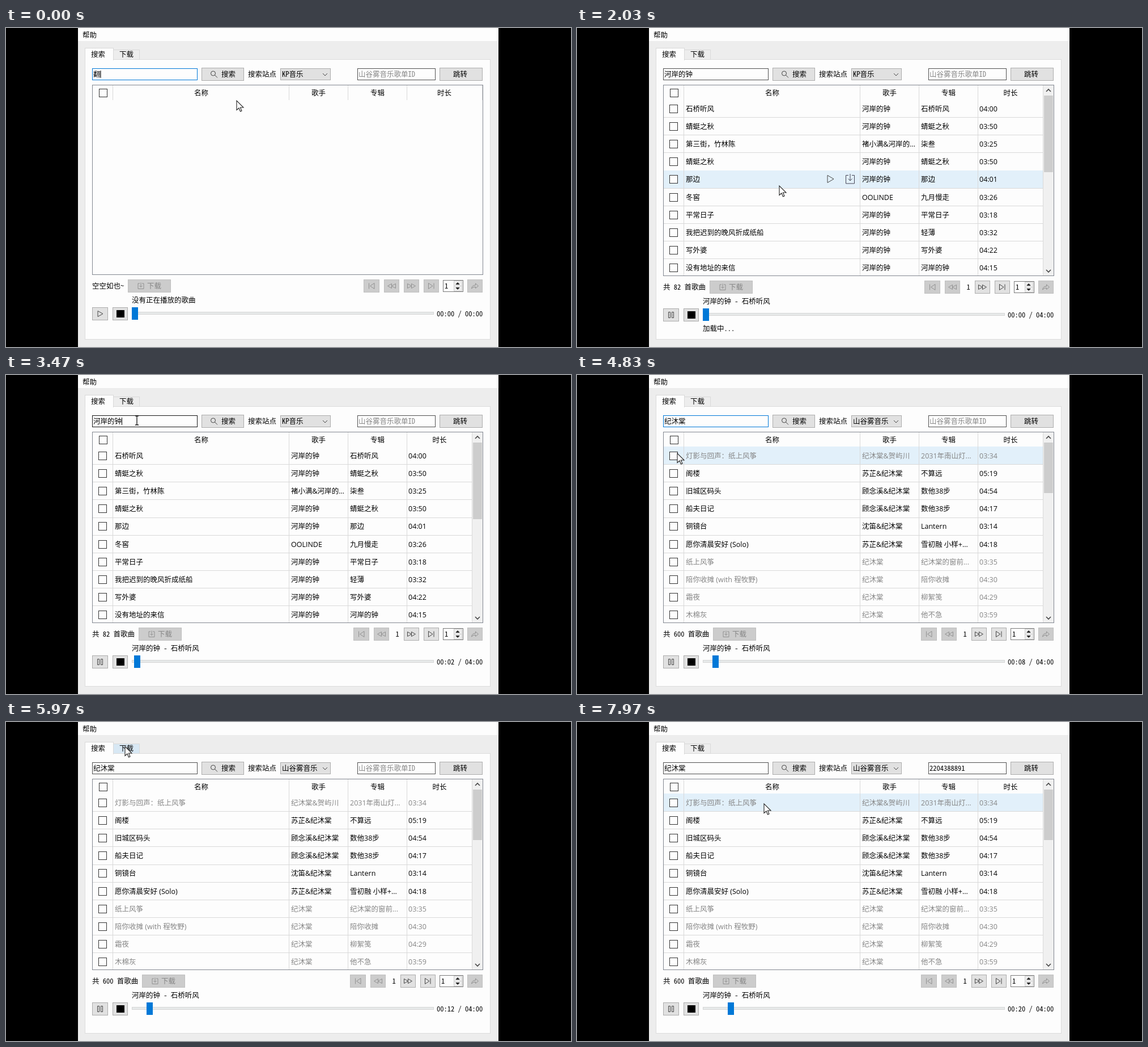
Animation, 997 px wide and 562 px high, one loop 8 s. Source, as an HTML page with a canvas:

```html
<!DOCTYPE html>
<html lang="zh-CN">
<head>
<meta charset="utf-8">
<style>
html, body { margin: 0; width: 100%; height: 100%; overflow: hidden; background: #000; }
canvas { display: block; }
</style>
</head>
<body>
<canvas id="stage" width="997" height="562"></canvas>
<script>
const c = document.getElementById('stage').getContext('2d');
const LOOP = 8000;
const UI = '12.5px "Noto Sans Mono CJK SC", "Noto Sans CJK SC", "Noto Sans CJK", monospace';
const CELL = '12.5px "Open Sans", "Noto Sans CJK SC", "Noto Sans CJK", sans-serif';
const PAPER = '#fdfdfd', INK = '#000', GREY = '#858585', BLUE = '#0078d7', RULE = '#d9d9d9';
const ROW_TOP = 126, ROW_HEIGHT = 31.15;

const BAND = '河岸的钟', SINGER = '纪沐棠', SITES = ['KP音乐', '山谷雾音乐'];

// title | artist | album | length; a leading "-" marks an unavailable song
const parse = list => list.trim().split('\n').map(line => ({
  off: line[0] === '-',
  cells: line.replace(/^-/, '').replaceAll('@', BAND).replaceAll('#', SINGER).split('|')
}));
const bandSongs = parse(`
石桥听风|@|石桥听风|04:00
蜻蜓之秋|@|蜻蜓之秋|03:50
第三街，竹林陈|褚小满&河岸的...|柒叁|03:25
蜻蜓之秋|@|蜻蜓之秋|03:50
那边|@|那边|04:01
冬窖|OOLINDE|九月慢走|03:26
平常日子|@|平常日子|03:18
我把迟到的晚风折成纸船|@|轻薄|03:32
写外婆|@|写外婆|04:22
没有地址的来信|@|@|04:15`);
const singerSongs = parse(`
-灯影与回声：纸上风筝|#&贺屿川|2031年南山灯...|03:34
阁楼|苏芷&#|不算远|05:19
旧城区码头|顾念溪&#|数他38步|04:54
船夫日记|顾念溪&#|数他38步|04:17
铜镜台|沈笛&#|Lantern|03:14
愿你清晨安好 (Solo)|苏芷&#|雪初融 小样+...|04:18
-纸上风筝|#|#的窗前...|03:35
-陪你收摊 (with 程牧野)|#|陪你收摊|04:30
-霜夜|#|柳絮笺|04:29
-木棉灰|#|他不急|03:59`);

// [time, value] steps: the last one reached applies
const step = (t, list) => list.filter(([at]) => t >= at).pop()[1];
const queries = [[0, '翻'], [260, ''], [420, BAND], [3620, ''], [3800, SINGER]];
const pages = [[0, null],
  [1000, { songs: bandSongs, count: 82, thumb: 135, shift: 0 }],
  [4650, { songs: singerSongs, count: 600, thumb: 89, shift: 6 }]];
const pointerPath = [[0, 407, 128], [420, 407, 128], [750, 385, 81], [900, 385, 81], [1450, 447, 141],
  [1600, 447, 141], [2030, 357, 278], [2700, 320, 240], [3300, 231, 80], [3850, 231, 80], [4150, 530, 81],
  [4300, 530, 81], [4500, 385, 81], [4600, 385, 81], [4830, 177, 138], [5400, 190, 190], [5970, 210, 43],
  [6120, 210, 43], [6500, 680, 80], [6750, 680, 80], [6930, 628, 139], [7970, 330, 144], [LOOP, 330, 144]];

function pointerAt(t) {
  const i = pointerPath.findIndex(p => p[0] > t);
  const [t0, x0, y0] = pointerPath[i - 1], [t1, x1, y1] = pointerPath[i];
  const k = (t - t0) / (t1 - t0), e = k * k * (3 - 2 * k);
  return { x: x0 + (x1 - x0) * e, y: y0 + (y1 - y0) * e };
}

function rect(x, y, w, h, fill) { c.fillStyle = fill; c.fillRect(x, y, w, h); }
function box(x, y, w, h, fill, border) {
  rect(x, y, w, h, border);
  rect(x + 1, y + 1, w - 2, h - 2, fill);
}
function text(s, x, y, color = INK, font = UI, align = 'left') {
  c.font = font; c.fillStyle = color; c.textAlign = align;
  c.fillText(s, x, y + 4.6);
}
function path(x, y, d, color, width = 1, fill) {
  c.save();
  c.translate(x, y);
  const p = new Path2D(d);
  if (fill) { c.fillStyle = fill; c.fill(p); }
  c.strokeStyle = color; c.lineWidth = width; c.stroke(p);
  c.restore();
}
const inside = (p, x, y, w, h) => p.x >= x && p.x < x + w && p.y >= y && p.y < y + h;

const ICON = {
  search: 'M2.5-1.5a4 4 0 1 1-8 0a4 4 0 1 1 8 0M1.5 1.5L6 6',
  save: 'M-2-4.5H-5V5H5V-4.5H2M0-6V2M-2.5-.5L0 2L2.5-.5',
  play: 'M-4-5L5 0L-4 5Z',
  pause: 'M-4.5-5h3v10h-3zM1.5-5h3v10h-3z',
  first: 'M-4.5-5V5M5-5L-2.5 0L5 5Z',
  back: 'M0-4L-7 0L0 4ZM7-4L0 0L7 4Z',
  next: 'M0-4L7 0L0 4ZM-7-4L0 0L-7 4Z',
  last: 'M4.5-5V5M-5-5L2.5 0L-5 5Z',
  go: 'M-6 4.5Q-5-1.5 1-1.5V-4.5L6 0L1 4V1.5Q-3 1-6 4.5Z',
  down: 'M-4-2L0 2L4-2',
  up: 'M-4 2L0-2L4 2'
};

function button(x, y, w, enabled = true, icon, iconX = w / 2) {
  box(x, y - 11, w, 23, enabled ? '#e1e1e1' : '#cccccc', enabled ? '#adadad' : '#bfbfbf');
  if (icon) path(x + iconX, y + .5, ICON[icon], enabled ? '#444' : '#909090');
}

function checkbox(x, y) { box(x - 7, y - 7, 15, 15, PAPER, '#333'); }

function drawFrameAndTabs(pointer) {
  rect(0, 0, 997, 562, '#000');
  rect(127, 0, 742, 562, '#ededed');
  rect(127, 0, 742, 23, PAPER);
  text('帮助', 135, 12);
  box(139, 55, 716, 494, PAPER, '#dcdcdc');
  const hover = inside(pointer, 190, 38, 46, 18);
  box(189, 38, 47, 18, hover ? '#d8e8f4' : '#ededed', '#d9d9d9');
  box(139, 35, 51, 22, PAPER, '#d9d9d9');
  rect(140, 54, 49, 3, PAPER);
  text('搜索', 150, 46);
  text('下载', 200, 46);
}

function drawToolbar(t, pointer) {
  const focused = t < 880 || (t >= 3500 && t < 5100);
  const edge = (x, w) => inside(pointer, x, 70, w, 22) ? '#171717' : '#505050';
  const query = step(t, queries);
  box(152, 71, 186, 21, PAPER, focused ? BLUE : edge(152, 186));
  text(query, 154, 81.5);
  if (t < 600 || (t >= 3430 && t < 3950)) rect(154 + query.length * 12.5, 75, 1, 13, '#000');

  button(345, 81, 75, true, 'search', 22);
  text('搜索', 380, 81.5);
  text('搜索站点', 427, 81.5);
  box(484, 71, 89, 21, '#e1e1e1', '#adadad');
  text(SITES[t < 4250 ? 0 : 1], 487, 81.5);
  path(563, 82, ICON.down, '#444');

  box(620, 71, 138, 21, PAPER, edge(620, 138));
  if (t < 6780) text(SITES[1] + '歌单ID', 622, 81.5, GREY);
  else text('2204388891', 622, 81.5);
  button(765, 81, 76);
  text('跳转', 789, 81.5);
}

function drawRow(song, i, pointer) {
  const top = ROW_TOP + i * ROW_HEIGHT, mid = Math.round(top + ROW_HEIGHT / 2 + .2);
  if (inside(pointer, 153, top, 670, ROW_HEIGHT)) {
    rect(153, Math.round(top), 670, 31, '#e2f0fa');
    if (!song.off) {
      path(447, mid, 'M-5-6.5L6 0L-5 6.5Z', '#444');
      path(482, mid, 'M-3-6.5H-7.5V8H7.5V-6.5H3M0-9V3M-3.5-.5L0 3L3.5-.5', '#445');
    }
  }
  rect(153, Math.round(top + ROW_HEIGHT), 670, 1, RULE);
  checkbox(170, mid);
  [192, 503, 607, 710].forEach((x, k) => text(song.cells[k], x, mid, song.off ? GREY : INK, CELL));
}

function drawTable(page, pointer) {
  const height = page ? 337 : 335, bottom = 100 + height;
  box(152, 100, 690, height, PAPER, '#828790');
  c.save();
  c.beginPath();
  c.rect(153, 101, 688, height - 2);
  c.clip();
  if (page) page.songs.forEach((song, i) => drawRow(song, i, pointer));
  for (const x of [188, 499, 603, 707]) rect(x, 101, 1, page ? height : 26, RULE);
  checkbox(171, 114);
  const heads = [['名称', 344.5], ['歌手', 551.5], ['专辑', 655.5], ['时长', page ? 765 : 773.5]];
  for (const [label, x] of heads) text(label, x, 114, INK, CELL, 'center');
  if (page) {
    rect(822, 101, 1, height, RULE);
    rect(823, 101, 18, height, '#f0f0f0');
    rect(824, 119, 16, page.thumb, '#cdcdcd');
    path(832, 110, ICON.up, '#444', 1.6);
    path(832, bottom - 9, ICON.down, '#444', 1.6);
  } else {
    rect(840, 101, 1, 26, RULE);
  }
  c.restore();
}

function drawPager(page, y) {
  const label = page ? `共 ${page.count} 首歌曲` : '空空如也~';
  text(label, 152, y);
  const saveX = page ? 234 + page.shift : 215;
  button(saveX, y, 76, false, 'save', 23);
  text('下载', saveX + 34, y + .5, GREY);

  const shift = page ? page.shift : 0, lead = page ? 18 : 0;
  button(631 - lead - shift, y, 28, false, 'first');
  button(667 - lead - shift, y, 27, false, 'back');
  if (page) text('1', 687.5 - shift, y);
  button(702 - shift, y, 27, !!page, 'next');
  button(737 - shift, y, 27, !!page, 'last');

  box(771 - shift, y - 10, 36 + shift, 21, PAPER, '#7a7a7a');
  text('1', 774 - shift, y);
  box(790, y - 9, 15, 10, '#eee', '#ccc');
  box(790, y, 15, 10, '#eee', '#ccc');
  path(797, y - 4, 'M-3 1.5L0-1.5L3 1.5Z', '#222', 1, '#222');
  path(797, y + 5, 'M-3-1.5L0 1.5L3-1.5Z', '#222', 1, '#222');
  button(814, y, 27, false, 'go');
}

function drawPlayer(t, y) {
  const started = t >= 1520;
  const seconds = Math.max(0, Math.floor((t - 2820) / 250));
  text(started ? `${BAND} - 石桥听风` : '没有正在播放的歌曲', 222, y - 24);
  button(152, y, 28, true, started ? 'pause' : 'play');
  button(188, y, 27);
  rect(195, y - 6, 14, 13, '#000');
  box(222, y - 3, 533, 5, '#e7eaea', '#d6d6d6');
  rect(Math.round(222 + seconds * 523 / 240), y - 11, 11, 22, BLUE);
  text(`00:${String(seconds).padStart(2, '0')} / ${started ? '04' : '00'}:00`, 760, y);
  if (started && t < 2820) text('加载中...', 222, y + 24);
}

function drawPointer(p) {
  const overField = inside(p, 152, 71, 186, 21) || inside(p, 620, 71, 138, 21);
  if (overField) path(p.x, p.y, 'M-3-8H-1L0-7L1-8H3M0-7V7M-3 8H-1L0 7L1 8H3', '#111', 1.3);
  else path(p.x, p.y, 'M0 0V16.5L4 13L6.5 19L9 18L6.5 12H12Z', '#222', 1.1, '#fff');
}

function draw(t) {
  const pointer = pointerAt(t), page = step(t, pages), drop = page ? 2 : 0;
  drawFrameAndTabs(pointer);
  drawToolbar(t, pointer);
  drawTable(page, pointer);
  drawPager(page, 454 + drop);
  drawPlayer(t, 503 + drop);
  drawPointer(pointer);
}

const start = performance.now();
function tick() {
  draw((performance.now() - start) % LOOP);
  requestAnimationFrame(tick);
}
tick();
</script>
</body>
</html>
```
